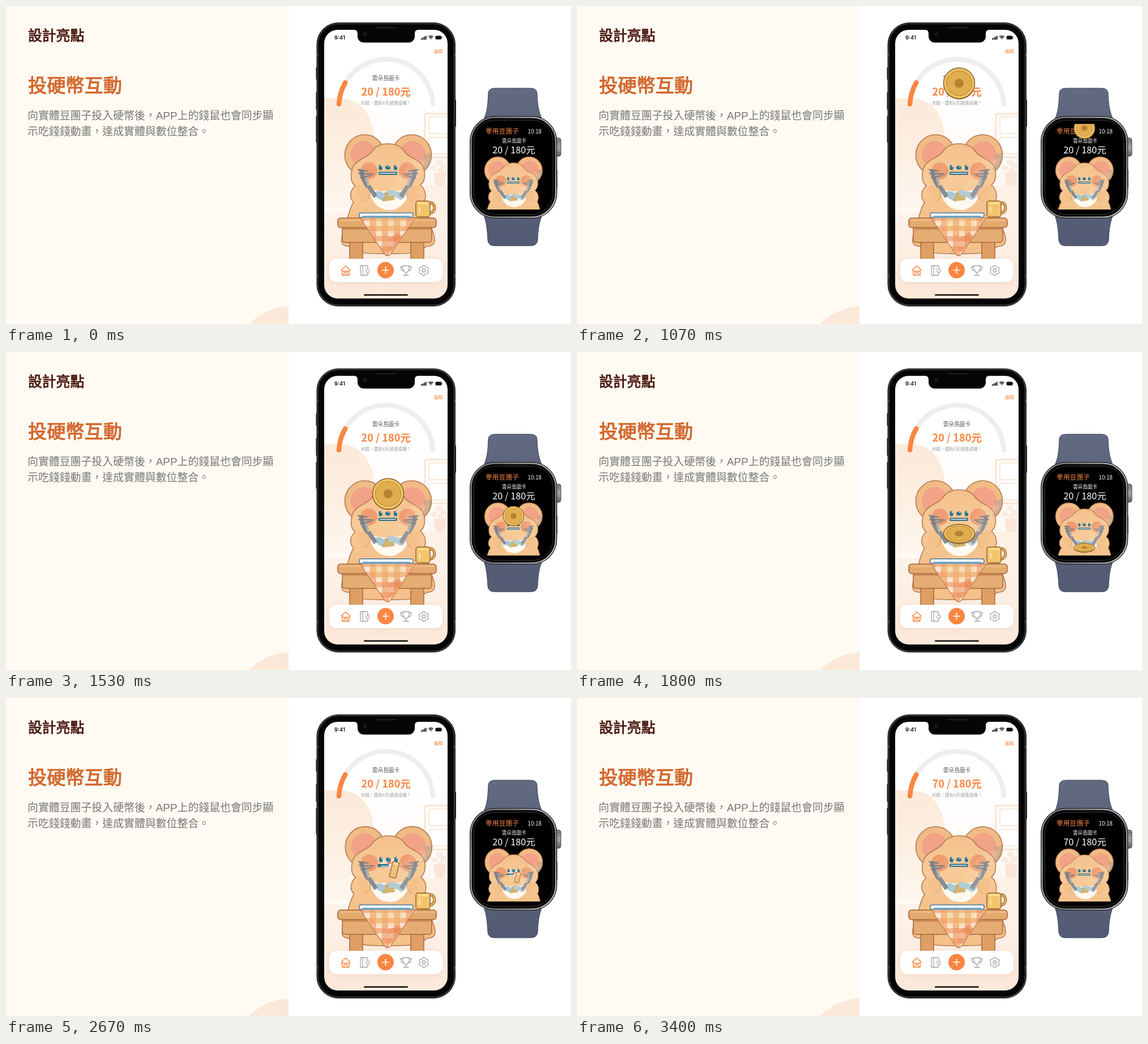
An HTML page with a canvas for the animation above (3.47 s loop, 998 by 561 pixels).

```html
<!DOCTYPE html>
<html lang="zh-Hant-TW">
<head>
<meta charset="utf-8">
<title>投硬幣互動</title>
<style>
  html, body { margin: 0; width: 100%; height: 100%; overflow: hidden; background: #fff; }
  canvas { display: block; width: 998px; height: 561px; }
</style>
</head>
<body>
<canvas id="stage" width="998" height="561"></canvas>
<script>
const ctx = document.getElementById('stage').getContext('2d');
const LOOP = 3470;
const CJK = '"Noto Sans CJK TC", "Noto Sans CJK", sans-serif';
const ORANGE = '#fb8642', OUTLINE = '#b5764a', BLUE = '#28718f';
const GOAL = '雲朵島圖卡';

function paint(fill, stroke, width = 1) {
  if (fill) { ctx.fillStyle = fill; ctx.fill(); }
  if (stroke) { ctx.strokeStyle = stroke; ctx.lineWidth = width; ctx.stroke(); }
}
function box(x, y, w, h, r, fill, stroke, width) {
  ctx.beginPath(); ctx.roundRect(x, y, w, h, r); paint(fill, stroke, width);
}
function oval(x, y, rx, ry, fill, stroke, width) {
  ctx.beginPath(); ctx.ellipse(x, y, rx, ry, 0, 0, 7); paint(fill, stroke, width);
}
function shape(d, fill, stroke, width = 1) {
  const p = new Path2D(d);
  if (fill) { ctx.fillStyle = fill; ctx.fill(p); }
  if (stroke) { ctx.strokeStyle = stroke; ctx.lineWidth = width; ctx.stroke(p); }
}
function text(s, x, y, size, color, weight = 400, align = 'left', family = CJK) {
  ctx.font = `${weight} ${size}px ${family}`;
  ctx.textAlign = align;
  ctx.fillStyle = color;
  ctx.fillText(s, x, y);
}
function roundText(s, x, y, size, color) {
  text(s, x, y, size, color, 500);
  ctx.strokeStyle = color;
  ctx.lineWidth = size * 0.035;
  ctx.strokeText(s, x, y);
}
function gradient(x0, y0, x1, y1, ...colors) {
  const g = ctx.createLinearGradient(x0, y0, x1, y1);
  colors.forEach((c, i) => g.addColorStop(i / (colors.length - 1), c));
  return g;
}
function layer(draw) { ctx.save(); draw(); ctx.restore(); }
function mirrored(draw) {
  draw();
  layer(() => { ctx.translate(1350, 0); ctx.scale(-1, 1); draw(); });
}
// Linear interpolation through [time, value] stops
function track(t, stops) {
  if (t <= stops[0][0]) return stops[0][1];
  for (let i = 1; i < stops.length; i++) {
    const [a, u] = stops[i - 1], [b, v] = stops[i];
    if (t <= b) return u + (v - u) * (t - a) / (b - a);
  }
  return stops[stops.length - 1][1];
}

function drawSlide() {
  ctx.fillStyle = '#fff';
  ctx.fillRect(0, 0, 998, 561);
  layer(() => {
    ctx.beginPath(); ctx.rect(0, 0, 499, 561); ctx.clip();
    ctx.fillStyle = '#fffbf3'; ctx.fillRect(0, 0, 499, 561);
    oval(503, 633, 103, 103, '#fbe8d9');
  });
  roundText('設計亮點', 39, 61, 24.8, '#4c1a10');
  roundText('投硬幣互動', 39, 152, 33.2, '#d2692f');
  const body = '"Liberation Sans", ' + CJK;
  text('向實體豆團子投入硬幣後，APP上的錢鼠也會同步顯', 38, 200, 18.9, '#767676', 400, 'left', body);
  text('示吃錢錢動畫，達成實體與數位整合。', 38, 228, 18.9, '#767676', 400, 'left', body);
}

function drawFace(t, chewing) {
  mirrored(() => oval(641, 291, 15, 15, '#ef9d72'));
  if (chewing) {
    const bite = Math.sin(t / 65);
    shape('M662 285L690 283L697 294L676 301L660 296Z', '#f6ded0');
    box(656, 293, 19, 5.5 + bite, 1, BLUE);
    box(661, 296, 13, 1.4, 0.7, '#fff');
    box(672, 288, 8, 5, 2, '#d9916f');
  } else {
    box(658, 292.5, 33, 5.5, 2, BLUE);
    box(660, 294.5, 29, 1.6, 0.8, '#f4e6db');
  }
  for (const x of [661.5, 688]) {
    box(x - 3, 280.5, 6, 9, 2.5, BLUE);
    oval(x + 1.5, 282.5, 1.2, 1.2, '#fff');
  }
  oval(674.5, 285, 4.5, 3.5, BLUE);
  oval(676, 283.5, 1.6, 1, '#e9c3a8');
}

function drawCutlery() {
  ctx.lineCap = 'round';
  shape('M618 319C626 315 637 317 642 326C645 337 637 347 627 345', '#f4c18a');
  shape('M642 327Q645 339 634 345', null, '#d59a65', 1);
  shape('M623 288L634 291L641 312L637 322Q626 309 623 288Z', 'rgba(116,123,134,.85)');
  shape('M634 291L641 312L638 318L631 293Z', 'rgba(190,190,188,.75)');
  shape('M637 319L643 315L656 334L650 339Z', '#858b95');
  shape('M622 288.5L638 291M623 295.5L649 296.5M626 303L645 299', null, '#767b82', 2);
}

function drawBear(t) {
  const chewing = t > 1990 && t < 3000;
  layer(() => {
    if (chewing) ctx.translate(0.8, 0.5 * Math.sin(t / 65));
    mirrored(() => {
      oval(633.5, 263, 35, 36, '#f1bb86', OUTLINE, 1.6);
      oval(632, 262, 23, 23.5, '#f1a287');
    });
    shape('M675 243C688 243 698 248 704 257C712 269 734 270 739 289C741 304 737 312 732 316C742 324 743 338 738 346' +
      'C746 360 747 385 755 401C760 417 756 424 743 424C726 439 700 437 674 437C648 437 622 439 606 424' +
      'C593 424 590 417 595 401C603 385 604 360 614 346C606 338 607 326 617 317C610 312 608 304 611 289' +
      'C616 270 638 269 646 257C652 248 662 243 675 243Z',
      gradient(0, 240, 0, 370, '#f3c08b', '#f7ca98', '#f4c18b'), OUTLINE, 1.5);
    shape('M751 260Q752 284 733 290Q742 276 738 262Z', 'rgba(135,145,151,.35)');
    drawFace(t, chewing);

    shape('M642 321C651 329 697 329 710 321C714 341 696 360 678 360C657 360 644 345 642 321Z', '#fffaf2');
    shape('M648 330Q658 323 667 330L680 324Q695 331 708 325Q707 341 696 342Q686 332 673 343Q659 346 648 330Z', '#a8c8d5');
    shape('M665 340L670 336L669 330Q672 326 676 332L675 336L684 334L687 342L665 345Z', '#cdab64');
    mirrored(drawCutlery);
    shape('M748 270L718 270L652 362L690 362Z', 'rgba(255,239,210,.12)');
  });
}

function drawCoin(t) {
  if (t < 590 || t > 2010) return;
  const y = track(t, [[590, 7], [1070, 136], [1330, 207], [1600, 265], [1800, 320], [1855, 345], [1910, 359]]);
  const ry = track(t, [[1550, 27], [1800, 16.5], [1855, 12], [1940, 6]]);
  const k = ry / 27;
  oval(675, y + 1.7 * (1 - k) + 1, 28, ry + 0.5, '#a97831');
  oval(675, y, 27.5, ry, '#f0c765', '#876031', 1.5);
  oval(675, y, 22.5, 22 * k, '#e0ae50', '#c78f39', 1.3);
  oval(675, y, 8, 8 * k, '#b98231');
}

function drawMorsel(x, y, w, h, angle) {
  layer(() => {
    ctx.translate(x, y);
    ctx.rotate(angle);
    box(-w / 2, -h / 2, w, h, 2, '#efc07c', '#9a6639', 1.4);
    box(-w / 2 + 2, -h / 2 + 1, w - 4, Math.min(4, h / 3), 1, '#f9dfae');
  });
}

function drawMeal(t) {
  if (t <= 2010 || t > 2960) return;
  if (t < 2450) drawMorsel(660, 358, 30, 11, -0.04);
  const start = t < 2450 ? 2010 : 2450;
  const lift = Math.min(1, (t - start) / 140);
  const height = track(t - start, [[190, 32], [220, 28], [400, 24], [510, 8]]);
  drawMorsel(675 + 11 * lift, 352 - 49 * lift, 12, height, 0.24 * lift);
}

function drawRoom() {
  ctx.fillStyle = gradient(0, 42, 0, 516, '#fff', '#fff', '#fffaf6', '#fdf0e6', '#fde8d9');
  ctx.fillRect(562, 42, 218, 474);
  shape('M562 163H592C626 164 648 190 650 236V362H562Z', gradient(0, 163, 0, 362, '#fcead9', '#fcefe2', '#fef7f0'));
  ctx.fillStyle = '#fffaf5';
  ctx.fillRect(562, 357, 50, 6);
  box(740, 190, 48, 77, 2, '#fffdf9', '#fae4d3', 3);
  box(747, 196, 40, 29, 1, '#fff', '#fae8da', 2);
  box(747, 232, 40, 29, 1, '#fff', '#fae8da', 2);
  ctx.fillStyle = '#fdf0e4';
  ctx.fillRect(738, 317, 42, 57);
  for (const [x, y] of [[756, 286], [765, 276], [773, 283], [768, 291]]) oval(x, y, 6, 5, '#fbebe1');
  shape('M755 294H778L774 317H759Z', '#fae5d7');
}

function drawTable() {
  for (const x of [607, 715]) box(x, 404, 23, 46, 2, '#dd9f64', '#a66a3e', 1.5);
  box(594, 383, 158, 34, 5, '#e5ad74', '#a66a3e', 1.5);
  ctx.fillStyle = '#cf9059';
  ctx.fillRect(595, 391, 156, 4);
  box(586, 374, 174, 17, 5, '#e4a96d', '#a66a3e', 1.6);
  box(589, 376, 168, 4, 2, '#ecb780');

  layer(() => {
    const cloth = new Path2D('M626 374H722L679 438Q674 443 669 438Z');
    ctx.fillStyle = '#fce4cf';
    ctx.fill(cloth);
    ctx.clip(cloth);
    ctx.fillStyle = 'rgba(241,150,96,.6)';
    for (let i = 0; i < 5; i++) ctx.fillRect(622 + i * 21, 374, 11, 68);
    for (let i = 0; i < 4; i++) ctx.fillRect(624, 370 + i * 18, 99, 9);
    oval(674, 385, 29, 17, 'rgba(235,202,123,.32)');
    shape('M675 410L692 400L700 405L674 440Z', 'rgba(229,108,59,.35)');
  });
  shape('M626 375L669 438Q674 443 679 438L722 375', null, '#b87749', 1.2);

  box(624, 365, 95, 8, 3, '#fff', '#47799b', 1.5);
  box(629, 370, 86, 4, 2, '#74a5bf');
  ctx.beginPath(); ctx.ellipse(749, 356, 8, 9, 0, -1.6, 1.6);
  paint(null, '#99622f', 5); paint(null, '#efbd5f', 2.4);
  box(724, 344, 25, 28, 4, '#f2c46c', '#99622f', 1.5);
  box(727, 346, 19, 4, 2, '#f9d98e');
  box(729, 354, 3, 11, 1.5, '#fae2a5');
}

function drawGauge(amount) {
  ctx.lineCap = 'round';
  ctx.beginPath(); ctx.arc(671, 177, 83, Math.PI * 1.015, Math.PI * 1.985); paint(null, '#eeeeef', 8.5);
  ctx.beginPath(); ctx.arc(671, 177, 83, Math.PI * 1.015, Math.PI * 1.168); paint(null, ORANGE, 8.5);
  text(GOAL, 671, 131, 9.7, '#555', 500, 'center');
  text(`${amount} / 180元`, 671, 157.5, 18.2, ORANGE, 700, 'center');
  text('米糕，還有6天就達成囉！', 671, 174, 7.7, '#999', 400, 'center');
}

function drawStatusBar() {
  text('9:41', 580, 59, 9.4, '#111', 600, 'left', 'Inter, sans-serif');
  for (let i = 0; i < 4; i++) box(733 + i * 2.6, 57 - i * 1.5, 1.8, 2.5 + i * 1.5, 0.5, '#111');
  ctx.lineCap = 'butt';
  for (const r of [1, 3.7, 6.3]) {
    ctx.beginPath(); ctx.arc(750.5, 59, r, -2.3, -0.85); paint(null, '#111', 1.6);
  }
  box(758.5, 52.5, 11, 6.5, 2, '#111');
  box(770, 54.5, 1, 2.5, 0.5, '#777');
  text('編輯', 756, 83, 7.7, ORANGE, 500);
}

function drawNav() {
  layer(() => {
    ctx.shadowColor = 'rgba(181,131,93,.18)';
    ctx.shadowBlur = 10;
    ctx.shadowOffsetY = 2;
    box(571, 446, 200, 41, 13, '#fff');
  });
  ctx.lineJoin = ctx.lineCap = 'round';
  shape('M592 466L600 458.5L608 466M594 466V475H606V466M597 475V472Q600 467 603 472V475M594 468H606', null, ORANGE, 1.5);
  const gray = '#a2a2a4';
  box(626, 458, 13, 17, 2, null, gray, 1.3);
  shape('M630 458V475M634 462H636', null, gray, 1.2);
  box(636, 465, 6, 5, 1.5, '#fff', gray, 1.2);
  oval(670.5, 466, 14.5, 14.5, ORANGE);
  shape('M665 466H676M670.5 460.5V471.5', null, '#fff', 1.7);
  shape('M701 458H712V464Q711 470 706.5 470Q702 470 701 464ZM701 460H697Q697 467 703 467M712 460H716Q716 467 710 467M706.5 470V474M702 475H711', null, gray, 1.3);
  ctx.beginPath();
  for (let i = 0; i <= 72; i++) {
    const a = i * Math.PI / 36, r = 8 + 0.9 * Math.cos(6 * a);
    ctx.lineTo(738 + r * Math.sin(a), 466.5 - r * Math.cos(a));
  }
  paint(null, gray, 1.3);
  oval(738, 466.5, 3, 3, null, gray, 1.3);
  box(632, 508.5, 78, 2.6, 1.3, '#111');
}

function drawPhone(t, amount) {
  for (const [y, h] of [[108, 22], [152, 31], [194, 47]]) box(547.5, y, 4, h, 1, '#222');
  box(791, 165, 4, 48, 1, '#222');
  box(549, 29.5, 244.5, 500, 38, '#2c2c2e', '#1c1c1e', 1);
  box(551, 31.5, 240.5, 496, 36, '#050506', '#414144', 1.2);
  ctx.fillStyle = '#4a4a4c';
  for (const x of [549, 791]) for (const y of [84, 474]) ctx.fillRect(x, y, 3, 4);
  layer(() => {
    ctx.beginPath(); ctx.roundRect(562, 42, 218, 474, 24); ctx.clip();
    drawRoom();
    drawGauge(amount);
    drawStatusBar();
    drawBear(t);
    drawTable();
    drawCoin(t);
    drawMeal(t);
    drawNav();
    box(621, 30, 101, 34.5, 11, '#050506');
    shape('M615 42Q621 42 621 49V41ZM728 42Q722 42 722 49V41Z', '#050506');
  });
  box(653, 37, 38, 2.5, 1.2, '#1b1b1d');
  oval(634, 50, 4, 4, '#101116');
  oval(634, 50, 1.5, 1.5, '#202738');
}

function drawWatch(t, amount) {
  const strap = gradient(0, 145, 0, 423, '#636b82', '#596178', '#596178', '#535b74');
  shape('M864 145H926Q937 145 938 153C939 177 941 187 948 202H843C850 187 851 177 852 153Q853 145 864 145Z', strap, '#3f465a', 1);
  shape('M843 366H948C941 382 940 395 939 413Q938 423 927 423H863Q852 423 851 413C850 395 849 382 843 366Z', strap, '#3f465a', 1);
  box(969, 233, 11, 32, 4, gradient(0, 233, 0, 265, '#77777b', '#d0d0d3', '#68686c'), '#333', 1);
  for (let y = 237; y < 263; y += 3) { ctx.fillStyle = '#505054'; ctx.fillRect(974, y, 5.5, 1); }
  box(970, 288, 4, 34, 2, '#414146');
  box(819.5, 194.5, 153.5, 180, 44, '#1e1e20', '#29292b', 1);
  box(821.5, 196.5, 149.5, 176, 42, '#09090a',
    gradient(821, 196, 971, 372, '#77777a', '#bcbcbf', '#8c8c90', '#d5d5d7'), 2);
  box(826.5, 201.5, 139.5, 166, 37, '#000', '#343437', 1);
  layer(() => {
    ctx.beginPath(); ctx.rect(840, 208, 114, 151); ctx.clip();
    text('零用豆團子', 847, 225, 11.8, '#f48547', 500);
    text('10:18', 946, 225, 9.8, '#fff', 400, 'right');
    text(GOAL, 897.5, 241, 8.6, '#fff', 400, 'center');
    text(`${amount} / 180元`, 897, 260, 16.4, '#fff', 500, 'center');
    ctx.translate(845, 266);
    ctx.scale(0.667, 0.667);
    ctx.translate(-598, -227);
    // The watch plays slightly ahead of the phone
    const ahead = t + 55;
    drawBear(ahead);
    drawCoin(ahead);
    drawMeal(ahead);
  });
}

function frame(now) {
  const t = now % LOOP;
  const amount = t < 3040 ? 20 : 70;
  ctx.lineJoin = 'round';
  drawSlide();
  drawPhone(t, amount);
  drawWatch(t, amount);
}

const startTime = performance.now();
function tick() {
  frame(performance.now() - startTime);
  requestAnimationFrame(tick);
}
tick();
</script>
</body>
</html>
```
